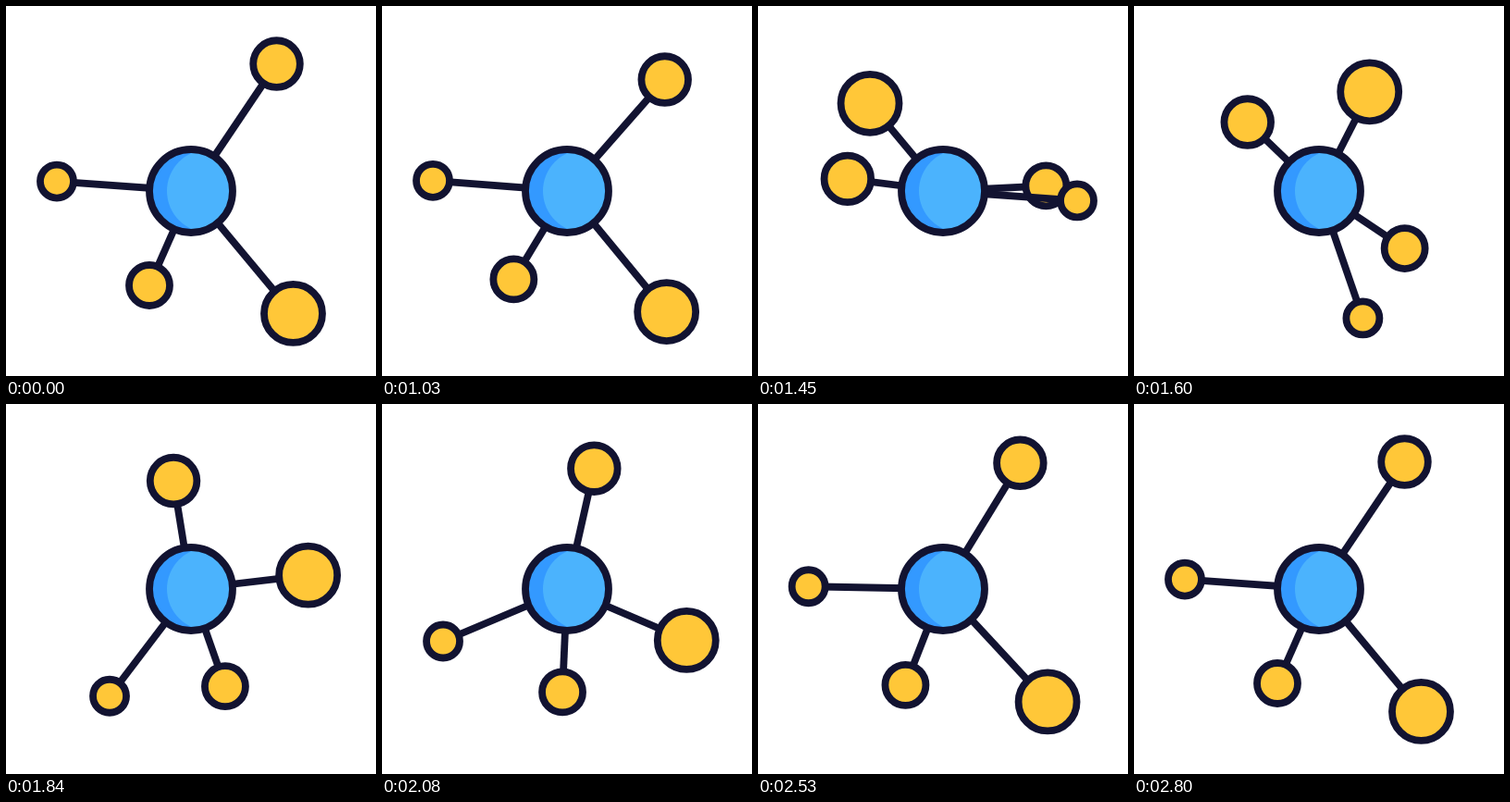
Recreate the animation shown at these times as an HTML page. Size 400 px wide and 400 px high, loop 2830 ms.

```html
<!DOCTYPE html>
<html lang="en">
<head>
<meta charset="utf-8">
<title>Orbiting nodes</title>
<style>
  html, body { margin: 0; width: 100%; height: 100%; overflow: hidden; background: #fff; }
  svg { display: block; width: 100%; height: 100%; }
  .ink { stroke: #121331; stroke-width: 7.8; }
  .node { fill: #ffc738; }
</style>
</head>
<body>
<svg viewBox="0 0 400 400">
  <defs>
    <clipPath id="disc"><circle cx="200" cy="200" r="45"/></clipPath>
  </defs>
  <g id="nodes"></g>
  <circle cx="200" cy="200" r="45" fill="#3399ff"/>
  <circle cx="219" cy="200" r="45" fill="#4bb3fd" clip-path="url(#disc)"/>
  <circle class="ink" cx="200" cy="200" r="45" fill="none"/>
</svg>
<script>
const LOOP = 2830, START = 1000, STEP = 30, STEPS = 60;

function bezier(x1, y1, x2, y2) {
  const at = (a, b, s) => 3 * s * (1 - s) ** 2 * a + 3 * s * s * (1 - s) * b + s ** 3;
  return x => {
    if (x <= 0 || x >= 1) return x <= 0 ? 0 : 1;
    let lo = 0, hi = 1;
    for (let i = 0; i < 40; i++) {
      const mid = (lo + hi) / 2;
      if (at(x1, x2, mid) < x) lo = mid; else hi = mid;
    }
    return at(y1, y2, lo);
  };
}

const quickSpin = bezier(1 / 6, 1 / 6, 0, 1);
const softSpin = bezier(1 / 3, 0, 0, 1);
const pullIn = bezier(1 / 6, 1 / 6, 0.7, 1);
const letOut = bezier(1 / 3, 0, 2 / 3, 1);

// dist: resting distance, pull: how far it is drawn in, turn: progress at the closest point
const nodes = [
  { r: 22, angle: 113.8, dist: 111.5, pull: 0, turn: 0.5, spin: quickSpin },
  { r: 25.3, angle: -56.05, dist: 165.7, pull: 62, turn: 0.219, spin: quickSpin },
  { r: 18, angle: 184.1, dist: 145.4, pull: 0, turn: 0.5, spin: softSpin },
  { r: 31.5, angle: 50.17, dist: 172.5, pull: 52.5, turn: 0.3, spin: softSpin }
];

function add(parent, tag, attrs) {
  const el = document.createElementNS("http://www.w3.org/2000/svg", tag);
  for (const key in attrs) el.setAttribute(key, attrs[key]);
  return parent.appendChild(el);
}

const layer = document.getElementById("nodes");
for (const n of nodes) {
  n.arm = add(layer, "line", { class: "ink", x1: 200, y1: 200 });
  n.dot = add(layer, "circle", { class: "ink node", r: n.r });
}

function draw(p) {
  for (const n of nodes) {
    const drawn = p < n.turn ? pullIn(p / n.turn) : 1 - letOut((p - n.turn) / (1 - n.turn));
    const dist = n.dist - n.pull * drawn;
    const a = (n.angle + 360 * n.spin(p)) * Math.PI / 180;
    const x = 200 + dist * Math.cos(a), y = 200 + dist * Math.sin(a);
    n.arm.setAttribute("x2", x);
    n.arm.setAttribute("y2", y);
    n.dot.setAttribute("cx", x);
    n.dot.setAttribute("cy", y);
  }
}

const origin = performance.now();
function tick() {
  const t = Math.max(0, performance.now() - origin) % LOOP;
  const step = Math.floor((t - START) / STEP);
  draw(Math.min(STEPS, Math.max(0, step)) / STEPS);
  requestAnimationFrame(tick);
}
tick();
</script>
</body>
</html>
```
